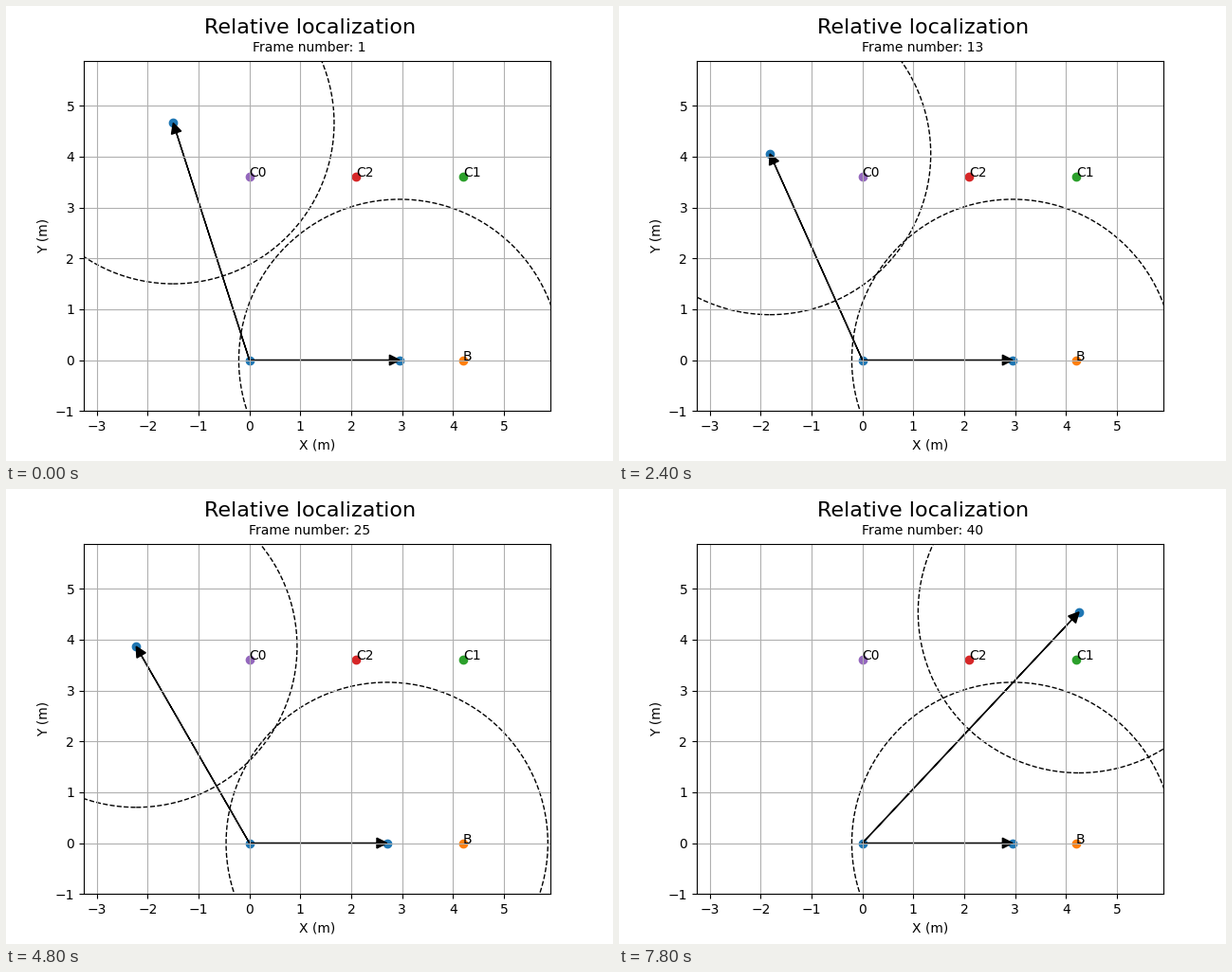
A matplotlib script that plays this animation: 640 by 480 pixels, repeating every 8 s.

```python
import matplotlib.pyplot as plt
import numpy as np
from matplotlib.animation import FuncAnimation

FRAMES = 40
INTERVAL = 200
RADIUS = np.sqrt(10)
SIDE = 4.2
HEIGHT = 3.6

# Turning points of the upper node: frame number -> (x, y)
TURNS = {
    1: (-1.498, 4.663),
    9: (-2.002, 3.909),
    17: (-1.637, 4.202),
    25: (-2.226, 3.866),
    31: (-0.928, 4.701),
    36: (2.384, 4.894),
    40: (4.256, 4.543),
}


def base_distance(number):
    """Steady at first, then a wobble that speeds up and fades."""
    u = np.clip((number - 17) / 23, 0, 1)
    return 2.953 - (0.393 - 0.325 * u) * np.sin(3 * np.pi * u ** 1.45)


def upper_node(number):
    return tuple(np.interp(number, list(TURNS), axis)
                 for axis in zip(*TURNS.values()))


def positions(number):
    return [(base_distance(number), 0), upper_node(number)]


def make_anchor(ax, name, x, y, color):
    ax.scatter(x, y, color=color)
    ax.text(x, y, name)


def make_arrow(ax, tip):
    return ax.arrow(0, 0, *tip, head_width=0.2, head_length=0.2,
                    length_includes_head=True, fc="k", ec="k")


def make_ring(ax, center):
    ring = plt.Circle(center, RADIUS, fill=False, ls="--", color="k")
    return ax.add_patch(ring)


fig, ax = plt.subplots(figsize=(6.4, 4.8), dpi=100)
fig.text(0.5015, 0.94, "Relative localization", ha="center", fontsize=16)
caption = fig.text(0.5, 0.9, "", ha="center")

ax.set_aspect("equal")
ax.set_xlim(-3.258, 5.917)
ax.set_ylim(-1, 5.89)
ax.set_xticks(range(-3, 6))
ax.set_yticks(range(-1, 6))
ax.set_xlabel("X (m)")
ax.set_ylabel("Y (m)")
ax.grid(True)

tips = positions(1)
dots = ax.scatter(*zip((0, 0), *tips), color="C0")
make_anchor(ax, "B", SIDE, 0, "C1")
for k, x in enumerate((0, SIDE, SIDE / 2)):
    make_anchor(ax, f"C{k}", x, HEIGHT, f"C{(k + 2) % 3 + 2}")
arrows = [make_arrow(ax, tip) for tip in tips]
rings = [make_ring(ax, tip) for tip in tips]


def update(i):
    number = i + 1
    tips = positions(number)
    caption.set_text(f"Frame number: {number}")
    dots.set_offsets([(0, 0), *tips])
    for arrow, ring, (x, y) in zip(arrows, rings, tips):
        arrow.set_data(dx=x, dy=y)
        ring.center = x, y
    return [caption, dots, *arrows, *rings]


anim = FuncAnimation(fig, update, frames=FRAMES, interval=INTERVAL,
                     repeat=True, repeat_delay=0)
plt.show()
```
